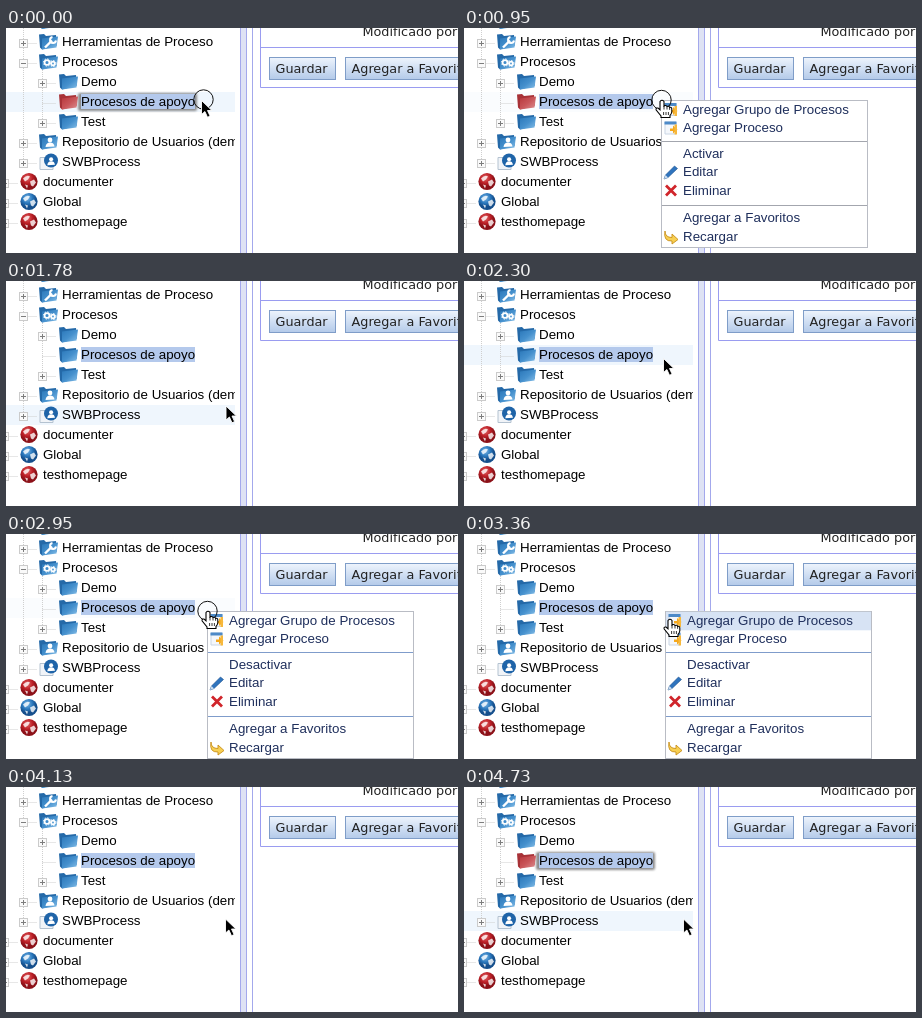
Recreate the animation shown at these times as an HTML page. Size 452 by 225 pixels, loop 4900 ms.

```html
<!DOCTYPE html>
<html lang="es">
<head>
<meta charset="utf-8">
<title>Menú contextual</title>
<style>
  html, body { margin: 0; width: 100%; height: 100%; overflow: hidden; background: #fff; }
  svg { display: block; width: 100%; height: 100%; }
  text { font: 13.333px "Liberation Sans", Arial, sans-serif; fill: #000; }
  .pane text { font: 12.8px "DejaVu Sans", sans-serif; fill: #222; }
  .menu text { fill: #1f2f5c; }
  .dots { stroke: #cfcfcf; stroke-dasharray: 1 1; fill: none; }
</style>
</head>
<body>
<svg viewBox="0 0 452 225" xmlns="http://www.w3.org/2000/svg">
  <defs>
    <linearGradient id="blue" x2="1" y2="1"><stop stop-color="#2b78ba"/><stop offset=".5" stop-color="#4590cd"/><stop offset="1" stop-color="#8bc2ea"/></linearGradient>
    <linearGradient id="red" x2="1" y2="1"><stop stop-color="#b8373c"/><stop offset=".5" stop-color="#c9565a"/><stop offset="1" stop-color="#dd9294"/></linearGradient>
    <linearGradient id="button" x2="0" y2="1"><stop stop-color="#eef4fc"/><stop offset=".45" stop-color="#d3e1f4"/><stop offset="1" stop-color="#b4cae9"/></linearGradient>
    <radialGradient id="globeBlue" cx=".4" cy=".3"><stop stop-color="#7fb9e6"/><stop offset=".6" stop-color="#2a78bd"/><stop offset="1" stop-color="#154f8c"/></radialGradient>
    <radialGradient id="globeRed" cx=".4" cy=".3"><stop stop-color="#e26a6a"/><stop offset=".6" stop-color="#bd2027"/><stop offset="1" stop-color="#8c1118"/></radialGradient>
    <clipPath id="treeClip"><path d="M0 0H229V225H0z"/></clipPath>
    <filter id="glow" x="-10%" y="-40%" width="120%" height="180%"><feGaussianBlur stdDeviation="1"/></filter>
  </defs>

  <g clip-path="url(#treeClip)">
    <rect id="rowHover" width="229" height="20" fill="#eff6fd"/>
    <rect id="focus" x="72" y="65" width="119" height="18" rx="2" fill="#8d8d8d" filter="url(#glow)"/>
    <rect x="75" y="66" width="114" height="15" fill="#b4c9ec"/>
    <g id="tree"></g>
  </g>

  <g class="pane">
    <path d="M234 0H241V225H234z" fill="#dee2f4"/>
    <path d="M234.5 0V225M240.5 0V225M246.5 0V225" stroke="#a3a8ec"/>
    <path d="M254.5 0V59.5H452M254 19.5H452" stroke="#9a9cf0" fill="none"/>
    <text x="356.5" y="8">Modificado por</text>
    <g fill="url(#button)" stroke="#7f9dc8">
      <rect x="263.5" y="29.5" width="66" height="22"/>
      <rect x="339.5" y="29.5" width="140" height="22"/>
    </g>
    <text x="269.5" y="45">Guardar</text>
    <text x="345.5" y="45">Agregar a Favoritos</text>
  </g>

  <g id="menu" class="menu">
    <rect x=".5" y=".5" width="206" height="147" fill="#fff" stroke="#b9bcc4"/>
    <rect id="itemHover" x="1" width="205" height="18.5" fill="#d7e3f4"/>
    <path id="rules" d="M1 41.5H206M1 105.5H206"/>
    <g id="items"></g>
  </g>

  <circle id="ring" r="9.7" fill="none" stroke="#111"/>
  <g id="arrow">
    <path d="M0 0V14L3.4 11L6 16.8L8.6 15.6L6 10H10.4z" fill="#000" stroke="#fff" stroke-width=".9"/>
  </g>
  <g id="hand">
    <path d="M-2 .5Q0 -2 2 .5V5Q4 3.8 5 5.6Q7 4.6 7.6 6.4Q10 5.8 9.8 8.4V11Q9.4 13 8 14.4V16.5H-1V15L-5.8 9Q-6.6 6.6 -4 7L-2 8.8z" fill="#fff" stroke="#000" stroke-width="1.1"/>
    <path d="M2 5V8.5M5 5.8V8.5M7.6 6.6V8.8M1.6 11V14M4 11V14M6.4 11V14" stroke="#000" stroke-width=".8"/>
  </g>
</svg>

<script>
const $ = id => document.getElementById(id);
const show = (id, on) => $(id).style.display = on ? '' : 'none';
const place = (id, x, y) => $(id).setAttribute('transform', `translate(${x} ${y})`);
const LOOP = 4900;

// Tree
const folder = (color, back, extra = '', id = '') =>
  `<path ${id && `id="${id}Back"`} d="M-9 -7L-4 -7.5L-2 -5.5L8 -6.5L9 4L-6 8L-8 6z" fill="${back}"/>
   <path ${id && `id="${id}"`} d="M-6 -3L10 -5L8.5 6L-6 8z" fill="url(#${color})"/>${extra}`;
const gear = (x, y, r) =>
  `<circle cx="${x}" cy="${y}" r="${r}" fill="none" stroke="#fff" stroke-width="1.7"/>
   <circle cx="${x}" cy="${y}" r="${r + 1.2}" fill="none" stroke="#fff" stroke-dasharray="1.4 1.4"/>`;
const wrench = '<path d="M-3 6L4 -1" stroke="#fff" stroke-width="2.4"/><path d="M4.5 -4.5A3 3 0 1 0 8 -1" fill="none" stroke="#fff" stroke-width="2"/>';
const person = '<circle cx="2" cy="-1.5" r="2.4" fill="#fff"/><path d="M-2.5 5.5Q-2 1 2 1Q6 1 6.5 5z" fill="#fff"/>';
const globe = color =>
  `<circle r="8.6" fill="url(#${color})"/>
   <path d="M-6 -3Q-2 -7 1 -5L-1 -2L-4 0zM1 0L5 -2L7 1L4 5L2 4zM-4 3L-1 4L-2 7z" fill="#fff" opacity=".8"/>`;

const BLUE_BACK = '#2469a8', RED_BACK = '#a83237';
const icons = {
  gears: folder('blue', BLUE_BACK, gear(-1, 1, 2.4) + gear(5, 2, 1.8)),
  tools: folder('blue', BLUE_BACK, wrench),
  plain: folder('blue', BLUE_BACK),
  state: folder('blue', BLUE_BACK, '', 'state'),
  users: folder('blue', BLUE_BACK, person),
  process: `<path d="M-8 -4H5V8H-8z" fill="#f1f4f8" stroke="#b4c2d0"/>
    <circle cx="3" cy="-1" r="7" fill="#1f64a8"/><g transform="translate(1.4 -1) scale(.85)">${person}</g>`,
  red: globe('globeRed'),
  blue: globe('globeBlue'),
};

const rows = [
  [1, '+', 'tools', 'Herramientas de Proceso'],
  [1, '-', 'gears', 'Procesos'],
  [2, '+', 'plain', 'Demo'],
  [2, '', 'state', 'Procesos de apoyo'],
  [2, '+', 'plain', 'Test'],
  [1, '+', 'users', 'Repositorio de Usuarios (demo)'],
  [1, '+', 'process', 'SWBProcess'],
  [0, '+', 'red', 'documenter'],
  [0, '+', 'blue', 'Global'],
  [0, '+', 'red', 'testhomepage'],
];
const toggle = (x, y, sign) => sign &&
  `<rect x="${x - 4}" y="${y - 4}" width="8" height="8" fill="#fafafa" stroke="#cbcbcb"/>
   <path d="M${x - 2.5} ${y}h5${sign === '+' ? `M${x} ${y - 2.5}v5` : ''}" stroke="#7d7d7d"/>`;

$('tree').innerHTML =
  '<path class="dots" d="M17.5 0V134M36.5 42V94"/><g transform="translate(42 -7)">' + icons.gears + '</g>' +
  rows.map(([level, sign, icon, label], i) => {
    const y = 13 + 20 * i, x = [-1.5, 17.5, 36.5][level];
    return `<path class="dots" d="M${x} ${y + 2.5}H${x + 13}"/>${toggle(x, y + 2.5, sign)}
      <g transform="translate(${[23, 42, 62][level]} ${y + .5})">${icons[icon]}</g>
      <text x="${[37, 56, 75][level]}" y="${y + 5}">${label}</text>`;
  }).join('');

// Context menu
const add = `<path d="M-6 -6H5V6H-6z" fill="#f4f7fb" stroke="#c9d5e4"/><path d="M-6.5 -6.5H5.5V-3.5H-6.5z" fill="#4d8ac8"/>
  <path d="M-1 .5H2V-2.5L6.5 1.5L2 5.5V3H-1z" fill="#f5a81c"/><path d="M3.5 -3.5H6V6.5H3.5z" fill="#f7b83c"/>`;
const pencil = '<path d="M-7 7L-5.5 3L3.5 -6L6.5 -3.5L-3 5.5z" fill="#2f74be" stroke="#1b4f8c" stroke-width=".6"/><path d="M-7 7L-5.5 3L-3 5.5z" fill="#c9dcf0"/>';
const cross = '<path d="M-5 -5L5 5M5 -5L-5 5" stroke="#d0252b" stroke-width="2.8"/>';
const reload = '<path d="M-6 -6Q-6 .5 1 .5V-3L7 2.5L1 7V4Q-8 4.5 -6 -6z" fill="#f7cf52" stroke="#c98f1a" stroke-width=".9"/>';
const items = [
  [9, add, 'Agregar Grupo de Procesos'],
  [27.5, add, 'Agregar Proceso'],
  [53, '', 'Activar'],
  [71.5, pencil, 'Editar'],
  [90, cross, 'Eliminar'],
  [117.5, '', 'Agregar a Favoritos'],
  [136.5, reload, 'Recargar'],
];
$('items').innerHTML = items.map(([y, icon, label], i) =>
  `<g transform="translate(10 ${y + .5})">${icon}</g><text id="item${i}" x="22" y="${y + 4.5}">${label}</text>`).join('');

// Pointer: [ms, shape, x, y]
const pointer = [
  [0, 'arrow', 195.5, 72.5],
  [950, 'hand', 198, 73],
  [1190, 'hand', 199, 77],
  [1250, 'hand', 202, 87],
  [1310, 'hand', 210, 104],
  [1370, 'hand', 219, 120],
  [1430, 'hand', 220, 123],
  [1480, 'hand', 220, 125],
  [1720, 'arrow', 220, 125],
  [1840, 'arrow', 220, 122],
  [1900, 'arrow', 218, 115],
  [1960, 'arrow', 214, 106],
  [2020, 'arrow', 209, 97],
  [2080, 'arrow', 206, 90],
  [2180, 'arrow', 203, 83],
  [2240, 'arrow', 201, 80],
  [2300, 'arrow', 199.5, 77.5],
  [2950, 'hand', 202, 78],
  [3360, 'hand', 206, 86],
  [3420, 'hand', 210, 96],
  [3480, 'hand', 215, 110],
  [3540, 'hand', 219, 122],
  [3600, 'hand', 221, 130],
  [3660, 'hand', 222, 133],
  [3710, 'hand', 221, 132],
  [4070, 'arrow', 219.5, 132],
];
const clicks = [0, 950, 1660, 2950, 4010];
const within = (t, from, to) => t >= from && t < to;

function draw(now) {
  const t = now % LOOP;
  const [, shape, x, y] = pointer.findLast(p => p[0] <= t);
  const first = within(t, 950, 1720), second = within(t, 2950, 4070), open = first || second;
  const inactive = t < 1780 || t >= 4190;

  for (const id of ['arrow', 'hand']) show(id, id === shape);
  place(shape, x, y);
  show('ring', clicks.some(c => within(t, c, c + 60)));
  place('ring', x + (shape === 'arrow' ? 2 : -.5), y - 1);

  show('menu', open);
  if (open) {
    const top = first ? 72 : 77;
    place('menu', first ? 197 : 201, top);
    $('item2').textContent = first ? 'Activar' : 'Desactivar';
    $('rules').setAttribute('stroke', first ? '#a3a6ae' : '#7f9ccb');
    const hit = items.find(([mid]) => Math.abs(y - top - mid) <= 9.8);
    const moved = t >= (first ? 1190 : 3360);
    show('itemHover', hit && moved);
    if (hit) $('itemHover').setAttribute('y', hit[0] - 8.2);
  }

  // The row hover fades as a menu opens
  const fading = within(t, 950, 1010) || within(t, 2950, 3010);
  show('rowHover', fading || !open && !within(t, 4070, 4730));
  $('rowHover').setAttribute('opacity', fading ? .35 : 1);
  $('rowHover').setAttribute('y', 4 + 20 * Math.floor((y - 4) / 20));
  show('focus', t < 950 || t >= 4190);
  $('state').setAttribute('fill', `url(#${inactive ? 'red' : 'blue'})`);
  $('stateBack').setAttribute('fill', inactive ? RED_BACK : BLUE_BACK);
  requestAnimationFrame(draw);
}
requestAnimationFrame(draw);
</script>
</body>
</html>
```
